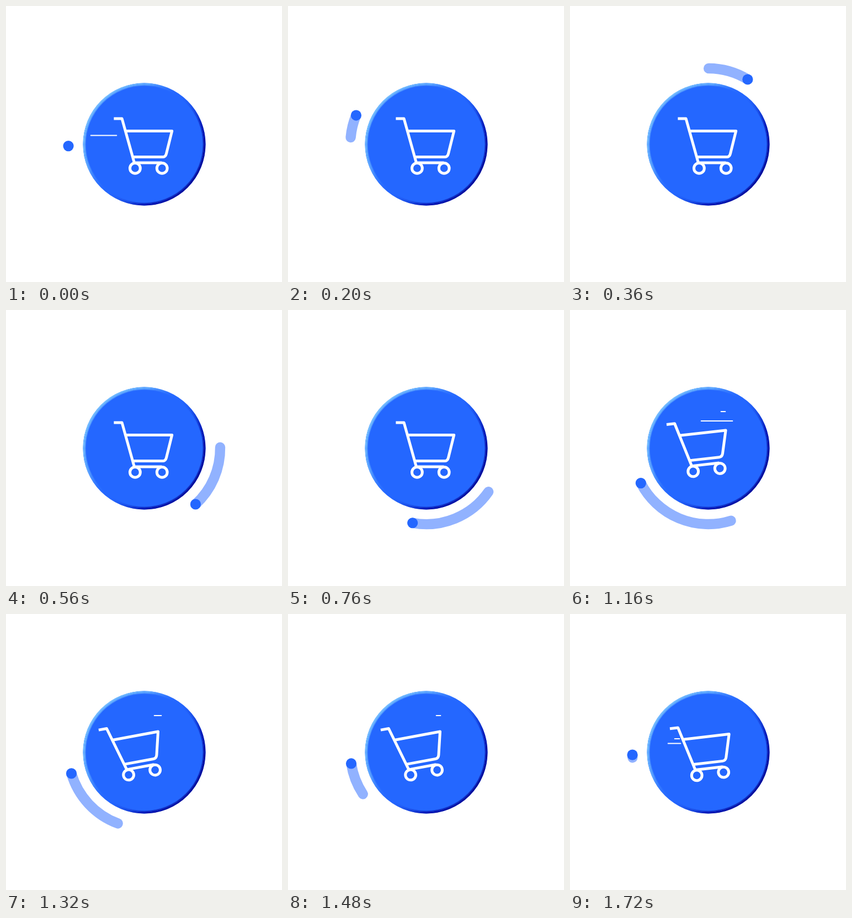
Animation, 500 px wide and 500 px high, one loop 1760 ms. Source, as an HTML page with a canvas:

```html
<!DOCTYPE html>
<html lang="en">
<head>
<meta charset="utf-8">
<title>Cart</title>
<style>
  html, body { margin: 0; width: 100%; height: 100%; overflow: hidden; background: #fff; }
  canvas { display: block; width: 500px; height: 500px; }
</style>
</head>
<body>
<canvas id="stage" width="500" height="500"></canvas>
<script>
const ctx = document.getElementById('stage').getContext('2d');
const LOOP = 1760, STEP = 40;
const C = 250.5, RADIUS = 111, ORBIT = 137.5;
const BLUE = '#2467ff', PALE = '#91b2ff';

const progress = (t, from, to) => Math.min(1, Math.max(0, (t - from) / (to - from)));
const smooth = u => u * u * (3 - 2 * u);
const easeIn = u => u * u;
const easeOut = u => 1 - (1 - u) ** 3;

// Same meaning as CSS cubic-bezier(), solved by bisection
function bezier(x1, y1, x2, y2) {
  const at = (a, b, s) => 3 * a * s * (1 - s) ** 2 + 3 * b * s * s * (1 - s) + s ** 3;
  return u => {
    let lo = 0, hi = 1;
    for (let i = 0; i < 30; i++) {
      const mid = (lo + hi) / 2;
      if (at(x1, x2, mid) < u) lo = mid; else hi = mid;
    }
    return at(y1, y2, lo);
  };
}

const travel = bezier(0.32, 0, 0, 0.93);
const shrink = bezier(0.4, 0, 0.4, 0.75);

// Each line is drawn leftwards from "start", then wiped the same way from "wipe"
const streaks = [
  { y: 201, from: 295, to: 237, start: 1040, wipe: 1160, time: 120 },
  { y: 184, from: 282, to: 268, start: 1030, wipe: 1410, time: 200 },
  { y: 234.5, from: 201, to: 153, start: 1680, wipe: 1760, time: 80 },
  { y: 226, from: 199, to: 189, start: 1680, wipe: 1720, time: 40 }
];

function circle(x, y, r) {
  ctx.beginPath();
  ctx.arc(x, y, r, 0, Math.PI * 2);
}

function drawDisc() {
  circle(C, C, RADIUS);
  ctx.fillStyle = BLUE;
  ctx.fill();
  const bevel = ctx.createLinearGradient(C - 90, C - 66, C + 90, C + 66);
  bevel.addColorStop(0, 'rgb(125,200,255)');
  bevel.addColorStop(0.25, 'rgba(105,180,255,0.85)');
  bevel.addColorStop(0.48, 'rgba(36,103,255,0)');
  bevel.addColorStop(0.78, 'rgba(0,10,170,0.9)');
  bevel.addColorStop(1, 'rgb(0,0,140)');
  ctx.strokeStyle = bevel;
  ctx.lineWidth = 1.2;
  for (let i = 0; i < 5; i++) {
    ctx.globalAlpha = 1 - (i / 5) ** 2;
    circle(C, C, RADIUS - 0.6 - i);
    ctx.stroke();
  }
  ctx.globalAlpha = 1;
}

function drawOrbit(t) {
  const first = -1.3;
  const head = first + 360 * travel(t / LOOP);
  // The trail grows evenly, then the end catches up with the dot
  const length = 87 * (progress(t, 0, 1010) - shrink(progress(t, 1010, LOOP)));
  const tail = Math.max(first, head - length);
  const rad = deg => (deg + 180) * Math.PI / 180;
  const a = rad(tail), b = rad(head);
  if (head - tail > 0.5) {
    ctx.beginPath();
    ctx.arc(C, C, ORBIT, a, b);
    ctx.lineCap = 'round';
    ctx.lineWidth = 18.4;
    ctx.strokeStyle = PALE;
    ctx.stroke();
  }
  circle(C + ORBIT * Math.cos(b), C + ORBIT * Math.sin(b), 9.6);
  ctx.fillStyle = BLUE;
  ctx.fill();
}

function drawCart(t) {
  const pull = progress(t, 1000, 1280), push = progress(t, 1660, LOOP);
  const shift = -11.5 * (easeOut(pull) - smooth(push));
  const tilt = -10.5 * (smooth(pull) - easeIn(push));
  ctx.save();
  ctx.translate(220.4 + shift, 294.3);
  ctx.rotate(tilt * Math.PI / 180);
  ctx.translate(-220, -294);
  ctx.strokeStyle = '#fff';
  ctx.lineWidth = 5;
  ctx.lineCap = 'butt';
  ctx.lineJoin = 'round';
  ctx.beginPath();
  ctx.moveTo(195, 203.8);
  ctx.lineTo(209.7, 203.8);
  ctx.lineTo(232, 283.6);
  ctx.lineTo(282, 283.6);
  ctx.moveTo(217, 226.2);
  ctx.lineTo(300.3, 226.2);
  ctx.lineTo(290, 267.5);
  ctx.quadraticCurveTo(288.5, 273.3, 283, 273.3);
  ctx.lineTo(230, 273.3);
  ctx.stroke();
  for (const x of [233.5, 282.3]) {
    circle(x, 293.6, 9.4);
    ctx.fillStyle = BLUE;
    ctx.fill();
    ctx.stroke();
  }
  ctx.restore();
}

function drawStreaks(t) {
  // The last lines are still being wiped as the loop begins again
  const now = t < 600 ? t + LOOP : t;
  ctx.strokeStyle = '#fff';
  ctx.lineWidth = 2;
  ctx.lineCap = 'round';
  for (const { y, from, to, start, wipe, time } of streaks) {
    const end = begin => from + (to - from) * progress(now, begin, begin + time);
    const left = end(start), right = end(wipe);
    if (right - left < 1.5) continue;
    ctx.beginPath();
    ctx.moveTo(left + 0.7, y);
    ctx.lineTo(right - 0.7, y);
    ctx.stroke();
  }
}

const origin = performance.now();
function frame() {
  const elapsed = Math.max(0, performance.now() - origin) % LOOP;
  const t = Math.floor(elapsed / STEP) * STEP;
  ctx.fillStyle = '#fff';
  ctx.fillRect(0, 0, 500, 500);
  drawDisc();
  drawOrbit(t);
  drawStreaks(t);
  drawCart(t);
  requestAnimationFrame(frame);
}
frame();
</script>
</body>
</html>
```
